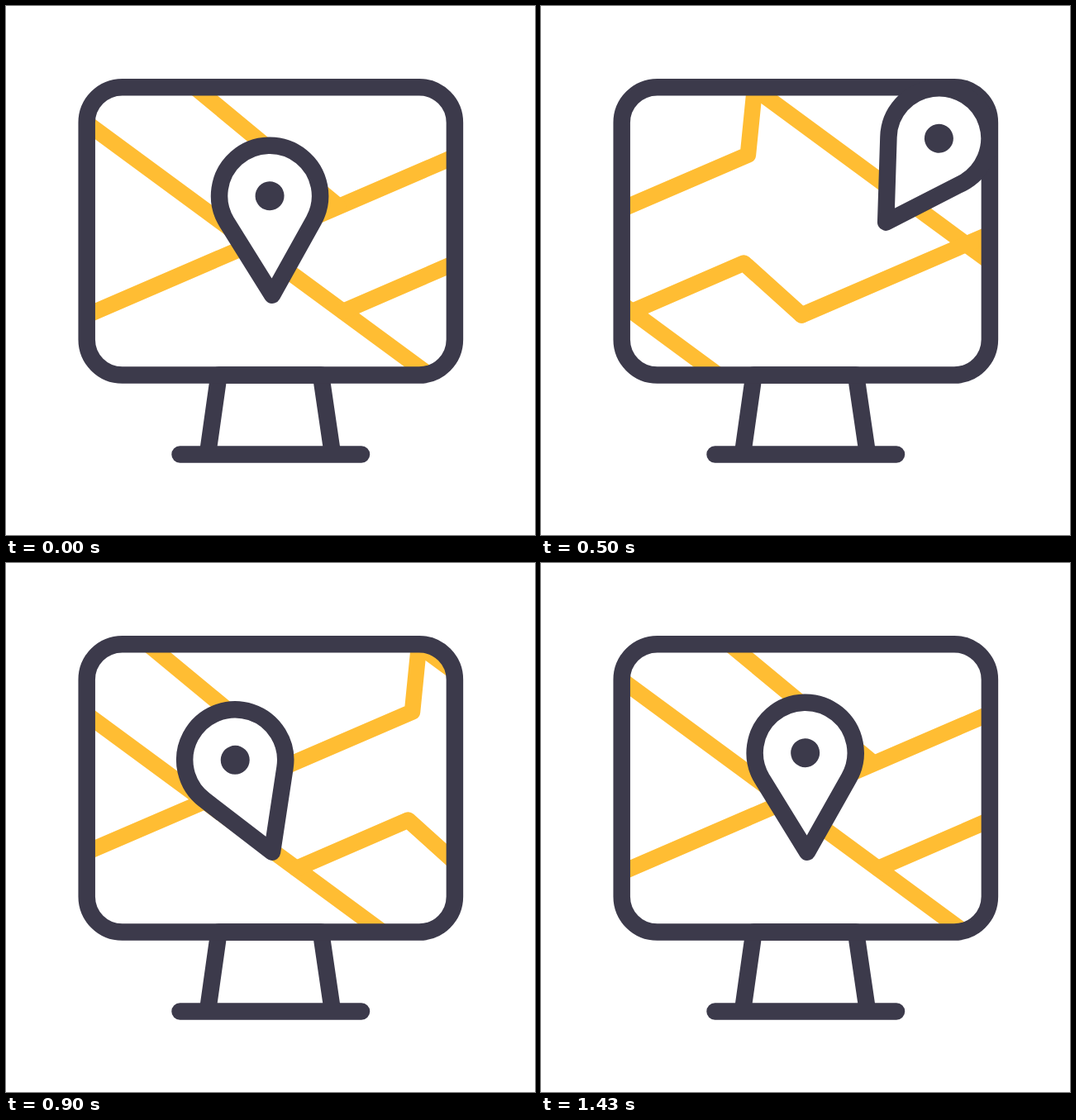
These frames come from a looping animation (640x640 px, 1.67 s). An HTML page:

```html
<!DOCTYPE html>
<html lang="en">
<head>
<meta charset="utf-8">
<title>Map pin on a monitor</title>
<style>
  html, body { margin: 0; width: 100%; height: 100%; overflow: hidden; background: #fff; }
  svg { display: block; width: 100%; height: 100%; }
  .ink, .road { fill: none; stroke-linecap: round; stroke-linejoin: round; }
  .ink { stroke: #3c3a4b; stroke-width: 20.5; }
  .road { stroke: #ffbd33; stroke-width: 19.5; }
</style>
</head>
<body>
<svg viewBox="0 0 640 640">
  <defs>
    <clipPath id="screen"><rect x="98" y="98" width="445" height="348.5" rx="43"/></clipPath>
    <g id="roads" class="road">
      <path d="M-256 100L220 450"/>
      <path d="M-199 374L251 180L259 100"/>
      <path d="M-69 98L105 242"/>
      <path d="M111 369.5L246 311L316 374"/>
    </g>
  </defs>
  <g clip-path="url(#screen)">
    <g id="map"><use href="#roads"/><use href="#roads" x="-515"/></g>
  </g>
  <g class="ink">
    <path d="M244 542L257.5 446.5H381L395 542M210.5 542.5H430"/>
    <rect x="97.7" y="98.2" width="445.2" height="348.4" rx="43"/>
  </g>
  <g id="pin">
    <path class="ink" style="fill:#fff" d="M0 0L-52.5 -89A61 61 0 1 1 52.5 -89Z"/>
    <circle cy="-120" r="17.5" fill="#3c3a4b"/>
  </g>
</svg>
<script>
const LOOP = 1670, REST = 43, PERIOD = 515;
const map = document.getElementById('map'), pin = document.getElementById('pin');

// The tip hops left, right and home along arcs bent towards "via"
const home = { x: 322, y: 349.7 }, left = { x: 197.5, y: 340 }, right = { x: 421, y: 261 };
const hops = [
  { start: 0, end: 6.6, from: home, via: { x: 260, y: 345 }, to: left },
  { start: 6.6, end: 15.6, from: left, via: { x: 271, y: 285 }, to: right },
  { start: 15.6, end: 26.9, from: right, via: { x: 315, y: 216 }, to: home }
];
// The head swings between these peaks: step, degrees
const swings = [[0, -1.4], [7, -27], [17.3, 41], [25, -28], [33, 11], [44, -1.4]];

const smooth = u => u * u * (3 - 2 * u);
const ramp = (t, a, b) => smooth(Math.min(1, Math.max(0, (t - a) / (b - a))));
const mix = (a, b, u) => a + (b - a) * u;

function tipAt(step) {
  const { start, end, from, via, to } = hops.find(hop => step < hop.end) || hops[2];
  const u = ramp(step, start, end);
  const arc = axis => mix(mix(from[axis], via[axis], u), mix(via[axis], to[axis], u), u);
  return [arc('x'), arc('y')];
}

function tiltAt(step) {
  const next = swings.findIndex(([at]) => step < at);
  const [a, from] = swings[next - 1], [b, to] = swings[next];
  return mix(from, to, ramp(step, a, b));
}

// Smooth scroll with a slightly brisker start
function scrollAt(step) {
  const u = Math.min(1, step / 34);
  return PERIOD * smooth(u + .28 * u * (1 - u) ** 5);
}

function draw() {
  const step = Math.min(REST, Math.floor((performance.now() % LOOP + 4) * .03)); // 30 poses a second
  map.setAttribute('transform', `translate(${297 + scrollAt(step)} 0)`);
  pin.setAttribute('transform', `translate(${tipAt(step)}) rotate(${tiltAt(step)})`);
  requestAnimationFrame(draw);
}
draw();
</script>
</body>
</html>
```
